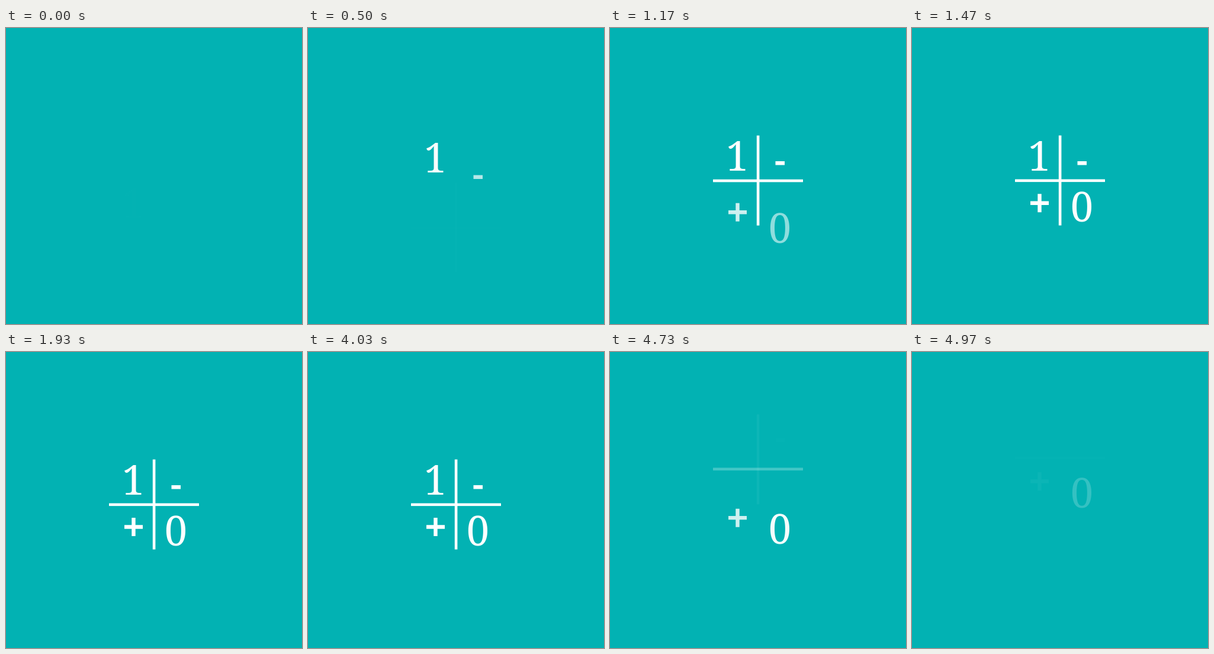
Animation, 500 px wide and 500 px high, one loop 5.01 s. Source, as an HTML page:

```html
<!DOCTYPE html>
<html lang="en">
<head>
<meta charset="utf-8">
<title>Plus and minus</title>
<style>
  html, body { margin: 0; width: 100%; height: 100%; overflow: hidden; background: #02b2b3; }
  svg { display: block; width: 100%; height: 100%; fill: #fff; }
  text { font: 68.6px "Noto Serif", serif; text-anchor: middle; }
</style>
</head>
<body>
<svg viewBox="0 0 500 500">
  <text id="one" x="215" y="241">1</text>
  <rect id="minus" x="279.5" y="225" width="15.5" height="6.5"/>
  <rect id="vertical" x="247.8" y="181.5" width="4.6" height="152"/>
  <rect id="horizontal" x="174" y="255.5" width="152" height="4.6"/>
  <path id="plus" d="M200 292.3h12.3v-12.3h6.4v12.3h12.3v6.4h-12.3v12.3h-6.4v-12.3h-12.3z"/>
  <text id="zero" x="287" y="327">0</text>
</svg>
<script>
const LOOP = 5010;
const DURATION = 940;
const TRAVEL = 80;

// Midpoints of each part's entrance and exit, in ms.
const parts = [
  ["one", 313, 4348],
  ["minus", 465, 4460],
  ["vertical", 768, 4572],
  ["horizontal", 823, 4684],
  ["plus", 1108, 4796],
  ["zero", 1163, 4908],
].map(([id, enter, exit]) => ({ node: document.getElementById(id), enter, exit }));

function expoInOut(x) {
  if (x <= 0) return 0;
  if (x >= 1) return 1;
  return x < 0.5 ? 2 ** (20 * x - 11) : 1 - 2 ** (9 - 20 * x);
}

const progress = (time, middle) => expoInOut((time - middle) / DURATION + 0.5);

function draw(time) {
  for (const { node, enter, exit } of parts) {
    const entered = progress(time, enter);
    const left = progress(time, exit);
    node.setAttribute("transform", `translate(0 ${TRAVEL * (1 - entered - left)})`);
    node.setAttribute("opacity", entered - left);
  }
}

const start = performance.now();
function tick() {
  draw((performance.now() - start) % LOOP);
  requestAnimationFrame(tick);
}
tick();
</script>
</body>
</html>
```
